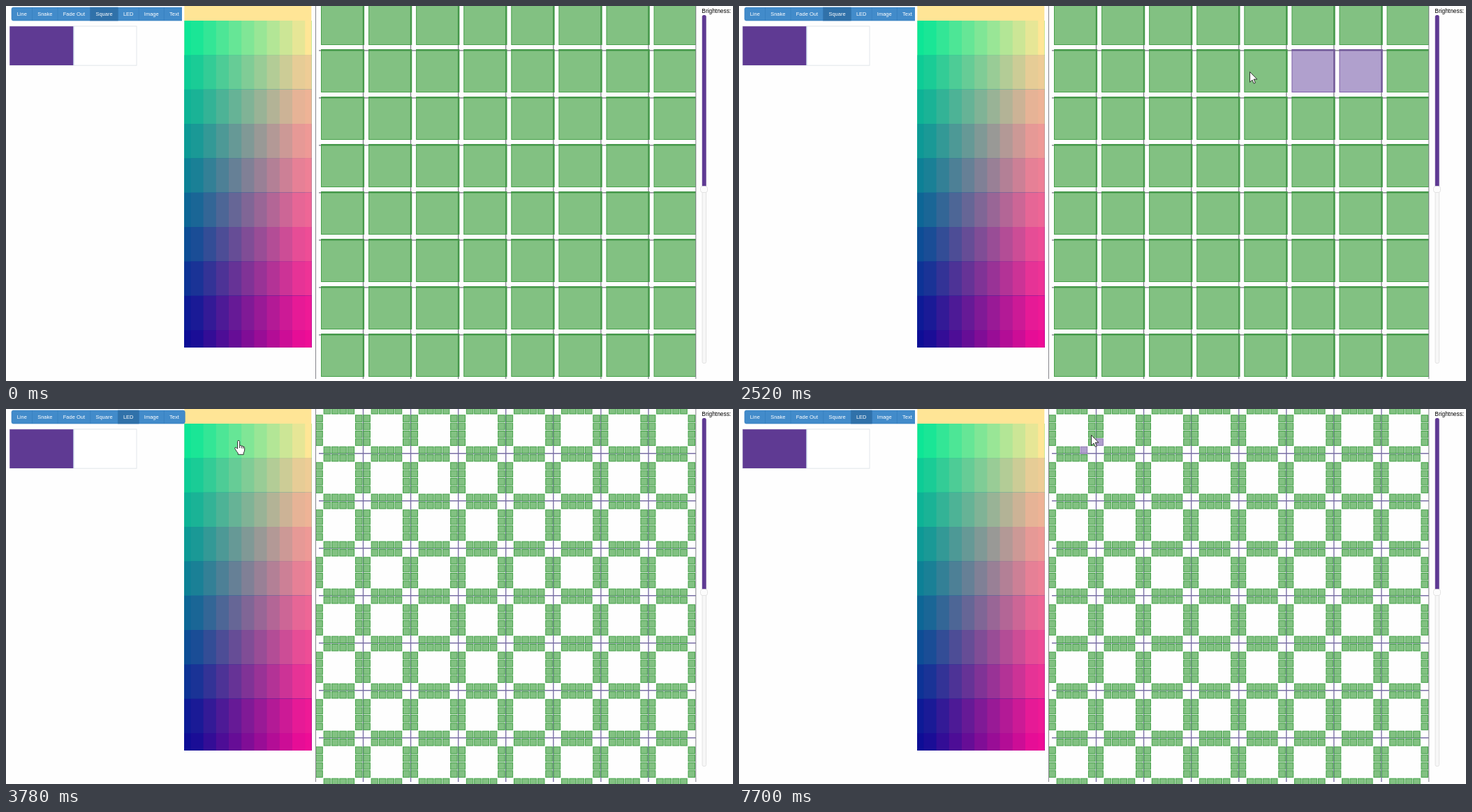
Recreate the animation shown at these times as an HTML page. Size 1041x538 px, loop 8000 ms.

```html
<!DOCTYPE html>
<html lang="en">
<head>
<meta charset="utf-8">
<title>LED matrix editor</title>
<style>
  html, body { margin: 0; width: 100%; height: 100%; overflow: hidden; background: #fefefe; }
  svg { display: block; width: 1041px; height: 538px; font-family: "Liberation Sans", Arial, sans-serif; }
</style>
</head>
<body>
<svg id="stage" viewBox="0 0 1041 538">
  <defs>
    <clipPath id="boardClip"><rect x="443" width="545" height="538"/></clipPath>
    <clipPath id="navClip"><rect id="navCut" width="252" height="24"/></clipPath>
  </defs>
  <g id="swatches">
    <rect x="5.3" y="29" width="181.7" height="56.2" fill="#fff" stroke="#e1e6ea"/>
    <rect x="5.3" y="29.2" width="91.2" height="55.8" fill="#5f3a93"/>
    <path d="M97 29V85" stroke="#bcd0e6"/>
  </g>
  <g id="palette"></g>
  <g id="nav" clip-path="url(#navClip)"></g>
  <path id="lines" fill="none"/>
  <g clip-path="url(#boardClip)">
    <g id="squares"></g>
    <g id="leds"></g>
  </g>
  <path d="M443.5 0V535M987.8 0V535" stroke="#85858c" fill="none"/>
  <g id="slider">
    <text x="996.3" y="10" font-size="8.4">Brightness:</text>
    <rect x="997" y="13.5" width="5.5" height="499" rx="2" fill="#f7f7f7" stroke="#dedede" stroke-width=".8"/>
    <rect x="996.8" y="13" width="5.8" height="247" rx="2.5" fill="#5f3a93"/>
    <rect x="994.5" y="258.5" width="10" height="9" rx="3" fill="#fcfcfc" stroke="#dcdcdc" stroke-width=".8"/>
  </g>
  <g id="cursor" stroke="#222" stroke-width=".9" stroke-linejoin="round" fill="#fff">
    <path id="arrow" d="M.5 .5V15.3L3.9 12L6.2 17.2L8.4 16.2L6.1 11.1H10.8Z"/>
    <path id="hand" d="M-1.5 12V1.6Q-1.5 .2 0 .2T1.6 1.6V7.6Q3.8 6.4 4.3 8.2Q6.4 7.4 6.7 9.2Q8.6 8.8 8.6 10.6V14Q8.3 16.5 7.2 18V20.3H-.8V18.2Q-3 16 -4.2 13.4Q-6 11.2 -5 10.3Q-3.8 9.4 -1.5 12ZM1.6 7.6V11M4.3 8.2V11.4M6.7 9.2V11.8"/>
  </g>
</svg>
<script>
const LOOP = 8000, STEP = 140;
const LEFT = 443.4, TOP = -4.2, COL = 68.08, ROW = 68;
const $ = id => document.getElementById(id);
const show = (el, on) => el.setAttribute("display", on ? "inline" : "none");

function set(el, attrs) {
  for (const k in attrs) el.setAttribute(k, attrs[k]);
  return el;
}

function add(parent, tag, attrs) {
  const el = document.createElementNS("http://www.w3.org/2000/svg", tag);
  return parent.appendChild(set(el, attrs));
}

// Each cell reaches to the far corner; later cells cover the rest, so no seams show.
function buildPalette() {
  const x0 = 255.3, y0 = 21, w = 18.2, h = 49.35, right = x0 + 10 * w, bottom = y0 + 9.5 * h;
  const level = k => Math.round(Math.min(238, Math.max(13, 25.5 * k)));
  const cell = (x, y, fill) =>
    add($("palette"), "rect", { x, y, width: right - x, height: bottom - y, fill });
  cell(x0, 0, "#ffe596");
  for (let j = 1; j <= 10; j++) {
    for (let i = 0; i <= 10; i++) {
      const r = i + j === 11 && j === 1 ? 255 : level(i);
      cell(x0 + Math.max(0, i - .5) * w, y0 + (j - 1) * h, `rgb(${r},${level(10 - j)},150)`);
    }
  }
}

const tabs = {};
function buildNav() {
  const nav = $("nav"), pad = 15.33;
  const bar = { x: 8, y: 2, width: 248.3, height: 19, rx: 2.5 };
  add(nav, "rect", { ...bar, fill: "#428bca" });
  let x = bar.x;
  for (const name of ["Line", "Snake", "Fade Out", "Square", "LED", "Image", "Text"]) {
    const tab = add(nav, "rect", { x, y: 2, height: 19, fill: "#3071a9", stroke: "#285e8e", "stroke-width": .5 });
    if (x > bar.x) add(nav, "path", { d: `M${x} 2V21`, stroke: "#357ebd", "stroke-width": .7 });
    const label = add(nav, "text", { x: x + pad / 2, y: 14, "font-size": 7.5, fill: "#fff" });
    label.textContent = name;
    const w = label.getComputedTextLength() + pad;
    tabs[name] = set(tab, { width: w });
    x += w;
  }
  add(nav, "rect", { ...bar, fill: "none", stroke: "#357ebd", "stroke-width": .6 });
}

function buildLines() {
  let d = "";
  for (let n = 1; n < 8; n++) d += `M${LEFT + n * COL} 0V535M448 ${TOP + n * ROW}H988`;
  set($("lines"), { d });
}

const squares = {}, leds = {};

function addSquare(r, c) {
  const x = LEFT + 8.1 + c * COL, y = TOP - 1.3 + r * ROW, size = 61;
  squares[[r, c]] = {
    face: add($("squares"), "rect", { x, y, width: size, height: size }),
    edge: add($("squares"), "path", { fill: "none", "stroke-width": 2.4,
      d: `M${x - .4} ${y + .8}H${x + size - .6}V${y + size + .4}` })
  };
}

// A ring of LEDs, four on each side of the cell, corners left open.
function addRing(r, c) {
  const pitch = 11.33, size = 9.5;
  for (let j = 0; j < 6; j++) {
    for (let i = 0; i < 6; i++) {
      if ((j % 5 === 0) === (i % 5 === 0)) continue;
      leds[[r, c, j, i]] = add($("leds"), "rect", {
        x: LEFT + .4 + c * COL + i * pitch, y: TOP + 1.7 + r * ROW + j * pitch,
        width: size, height: size });
    }
  }
}

function paintSquare(key, on) {
  const { face, edge } = squares[key];
  set(face, { fill: on ? "#b0a0cd" : "#82c182", stroke: on ? "#7f61a9" : "#46a04a" });
  set(edge, { stroke: on ? "#725b98" : "#45984a" });
}

function paintLed(key, on) {
  set(leds[key], { fill: on ? "#b0a0cd" : "#82c182", stroke: on ? "#8d7bb0" : "#43a047" });
}

// Pointer moves: start, end, target x, target y
const START = [1014, 14];
const moves = [
  [140, 1120, 900, 95], [1260, 1820, 828, 95], [2100, 2520, 731, 94],
  [2940, 3640, 179, 9], [3640, 3780, 333, 45], [3780, 4200, 461, 60],
  [4340, 4620, 478, 60], [4620, 4760, 475.5, 60], [5320, 5880, 489, 58],
  [6160, 6580, 505, 50], [7140, 7700, 504, 37]
];

function pointerAt(t) {
  let [x, y] = START;
  for (const [from, to, tx, ty] of moves) {
    const f = Math.min(1, Math.max(0, (t - from) / (to - from))) ** .7;
    x += (tx - x) * f;
    y += (ty - y) * f;
  }
  return [x, y];
}

const squareHits = { "1,6": 1260, "1,5": 2100, "1,4": 2940 };
const ledHits = { "0,0,5,4": 5880, "0,1,4,0": 7280 };
const PRESS = 3640, SWITCH = 3780, SETTLE = 4060;

function draw(t) {
  const ledMode = t >= SWITCH;
  show($("squares"), !ledMode);
  show($("leds"), ledMode);
  set($("lines"), { stroke: ledMode ? "#7a70a6" : "#74747f", "stroke-width": ledMode ? 1.4 : 1.2 });
  for (const name in tabs) show(tabs[name], name === (t >= PRESS ? "LED" : "Square"));
  set($("navCut"), { width: ledMode && t < SETTLE ? 257 : 252 });
  for (const key in squareHits) paintSquare(key, t >= squareHits[key]);
  for (const key in ledHits) paintLed(key, t >= ledHits[key]);

  const [x, y] = pointerAt(t);
  const overLink = (x > 255 && x < 437) || (x < 256 && y < 21);
  show($("cursor"), t >= STEP);
  show($("hand"), overLink);
  show($("arrow"), !overLink);
  set($("cursor"), { transform: `translate(${x} ${y})` });
}

function tick() {
  const t = performance.now() % LOOP;
  draw(Math.floor(t / STEP) * STEP);
  requestAnimationFrame(tick);
}

buildPalette();
buildNav();
buildLines();
for (let r = 0; r < 8; r++) {
  for (let c = 0; c < 8; c++) {
    addSquare(r, c);
    addRing(r, c);
  }
}
for (let c = 0; c < 8; c++) addRing(8, c);
for (const key in squares) paintSquare(key, false);
for (const key in leds) paintLed(key, false);
tick();
</script>
</body>
</html>
```
